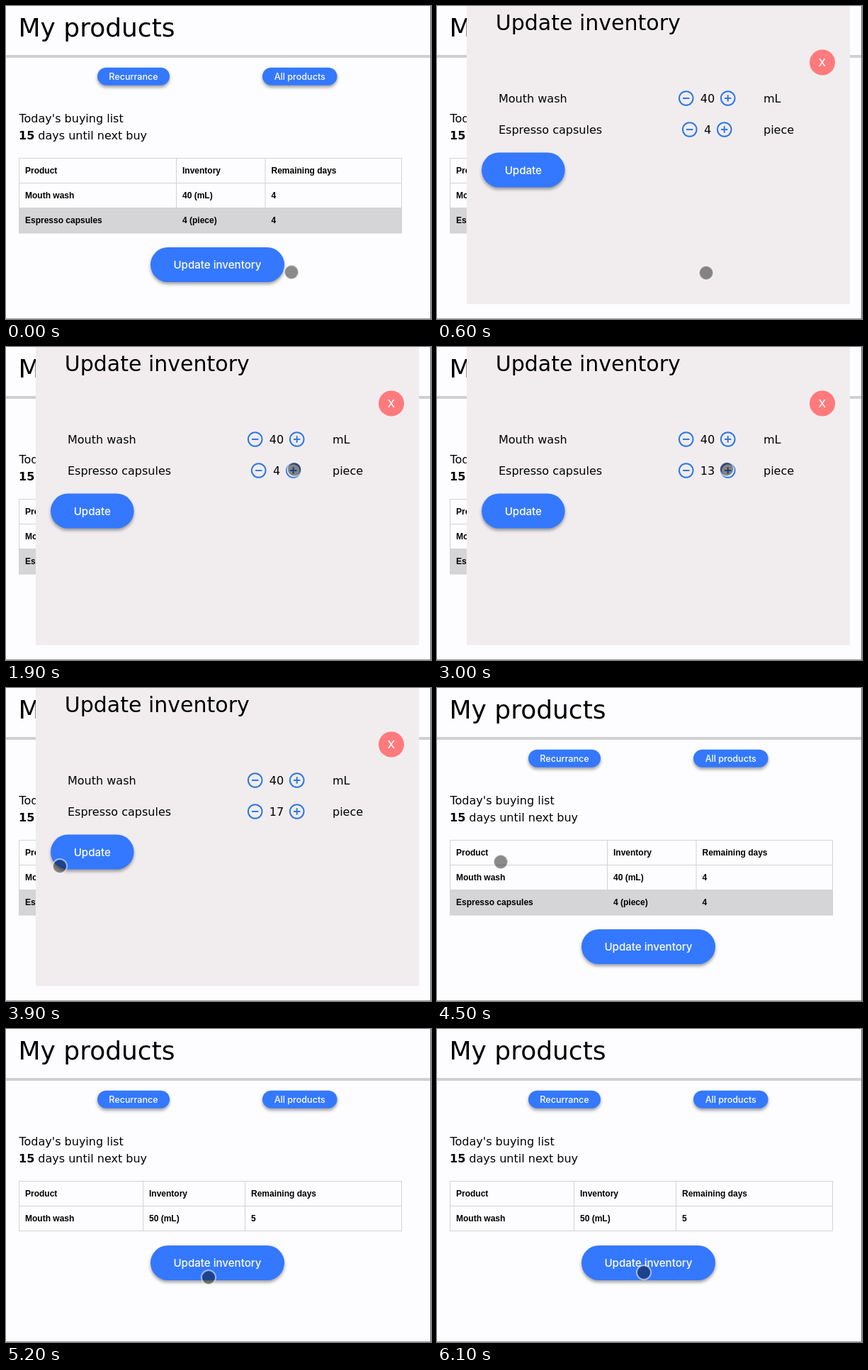
Recreate the animation shown at these times as an HTML page. Size 600x441 px, loop 6.2 s.

```html
<!DOCTYPE html>
<html lang="en">
<head>
<meta charset="utf-8">
<title>My products</title>
<style>
  html, body { margin: 0; width: 100%; height: 100%; overflow: hidden; background: #fdfcfe; }
  svg { display: block; width: 600px; height: 441px; }
  text { font: 16px "DejaVu Sans", Verdana, sans-serif; }
  .cell { font: bold 12px "Liberation Sans", Arial, sans-serif; }
  .label { font: 500 15.1px Inter, sans-serif; fill: #fff; text-anchor: middle; }
  .small { font-size: 12.6px; }
  .mid { text-anchor: middle; }
  .button { fill: #3478ff; filter: drop-shadow(0 3px 2px rgba(0, 0, 0, .36)); }
  .line { fill: none; stroke: #d3d2d4; }
  .step { fill: none; stroke: #2f78e6; stroke-width: 2; }
</style>
</head>
<body>
<svg id="stage" viewBox="0 0 600 441"></svg>
<script>
const LOOP = 6200, STEP = 100;
const OPEN = 500, CLOSE = 4400, REFRESH = 4700;
const FIRST_CLICK = 1780, CLICK_GAP = 130, CLICKS = 13;

// Pointer path: time, x, y
const path = [
  [0, 403, 375], [300, 378, 371], [500, 376, 372], [700, 384, 380],
  [1000, 518, 70], [1500, 406, 172], [2500, 409, 173], [3000, 409, 172],
  [3500, 410, 173], [3900, 76, 251], [4100, 82, 256], [4300, 84, 252],
  [4500, 90, 245], [4650, 100, 250], [5000, 268, 356], [5200, 286, 350],
  [5350, 290, 361], [5500, 292, 343], [6200, 292, 343]
];

const text = (x, y, s, cls = "", size = "") =>
  `<text x="${x}" y="${y}" class="${cls}"${size && ` style="font-size:${size}px"`}>${s}</text>`;

const button = (x, y, w, h, s, cls = "") =>
  `<rect class="button" x="${x}" y="${y}" width="${w}" height="${h}" rx="${h / 2}"/>` +
  text(x + w / 2, y + h / 2 + (cls ? 4.6 : 5.8), s, "label " + cls);

function table(columns, rows, shaded) {
  const bottom = 214.5 + rows.length * 35;
  let out = "";
  rows.forEach((row, i) => {
    const y = 214.5 + i * 35;
    out += `<rect class="line" x="18.5" y="${y}" width="540" height="35"/>`;
    row.forEach((s, j) => out += text(columns[j] + 8.5, y + 21.5, s, "cell"));
  });
  for (const x of columns.slice(1)) out += `<path class="line" d="M${x} 214.5V${bottom}"/>`;
  const shade = shaded ? `<rect x="18" y="284" width="541" height="36.5" fill="#d5d4d6"/>` : "";
  return shade + out + button(204, bottom + 20.5, 189, 49, "Update inventory");
}

const stepper = (x, y, plus) =>
  `<g class="step"><circle cx="${x}" cy="${y}" r="9.8"/>` +
  `<path d="M${x - 4.7} ${y}h9.4${plus ? `M${x} ${y - 4.7}v9.4` : ""}"/></g>`;

function item(y, name, count, unit) {
  const reach = count > 9 ? 29.5 : 24.5;
  return text(87, y + 6, name) + text(382, y + 6, count, "mid") + text(461, y + 6, unit) +
    stepper(381.2 - reach, y, false) + stepper(381.2 + reach, y, true);
}

const modal = count =>
  `<rect x="42" width="541" height="420" fill="#f1edef"/>` +
  text(82.8, 34, "Update inventory", "", 30) +
  `<circle cx="544" cy="79.5" r="18" fill="#ff7a7c"/>` + text(543.7, 85, "X", "label") +
  item(130, "Mouth wash", 40, "mL") +
  item(174, "Espresso capsules", count, "piece") +
  button(63, 206.5, 117.6, 49, "Update");

const header = ["Product", "Inventory", "Remaining days"];
const before = table([18.5, 240.5, 366], [
  header, ["Mouth wash", "40 (mL)", "4"], ["Espresso capsules", "4 (piece)", "4"]
], true);
const after = table([18.5, 193.5, 337.5], [header, ["Mouth wash", "50 (mL)", "5"]], false);

const page =
  text(17.5, 43, "My products", "", 36) +
  `<rect y="69" width="600" height="4" fill="#d0cfd1"/>` +
  button(129, 86.7, 102, 25, "Recurrance", "small") +
  button(362, 86.7, 105.5, 25, "All products", "small") +
  text(18.5, 164, "Today's buying list") +
  text(18, 188, `<tspan font-weight="bold">15</tspan> days until next buy`);

const edges = `<path d="M0 440.5H600" stroke="#9c9b9d"/><path d="M599.5 0V441" stroke="#66656a"/>`;

function pointer(t) {
  const i = path.findIndex(p => p[0] > t);
  const [t0, x0, y0] = path[i - 1], [t1, x1, y1] = path[i];
  const u = (t - t0) / (t1 - t0), k = u * u * (3 - 2 * u);
  return `<circle cx="${x0 + (x1 - x0) * k}" cy="${y0 + (y1 - y0) * k}" r="10"
    fill="rgba(0,0,0,.45)" stroke="rgba(255,255,255,.55)" stroke-width="2"/>`;
}

const stage = document.getElementById("stage");
const start = performance.now();
let shown = -1;

function draw() {
  const t = Math.floor((performance.now() - start) % LOOP / STEP) * STEP;
  if (t !== shown) {
    shown = t;
    const clicks = Math.floor((t - FIRST_CLICK) / CLICK_GAP);
    const count = 4 + Math.max(0, Math.min(CLICKS, clicks));
    stage.innerHTML = page + (t < REFRESH ? before : after) +
      (t >= OPEN && t < CLOSE ? modal(count) : "") + edges + pointer(t);
  }
  requestAnimationFrame(draw);
}
draw();
</script>
</body>
</html>
```
